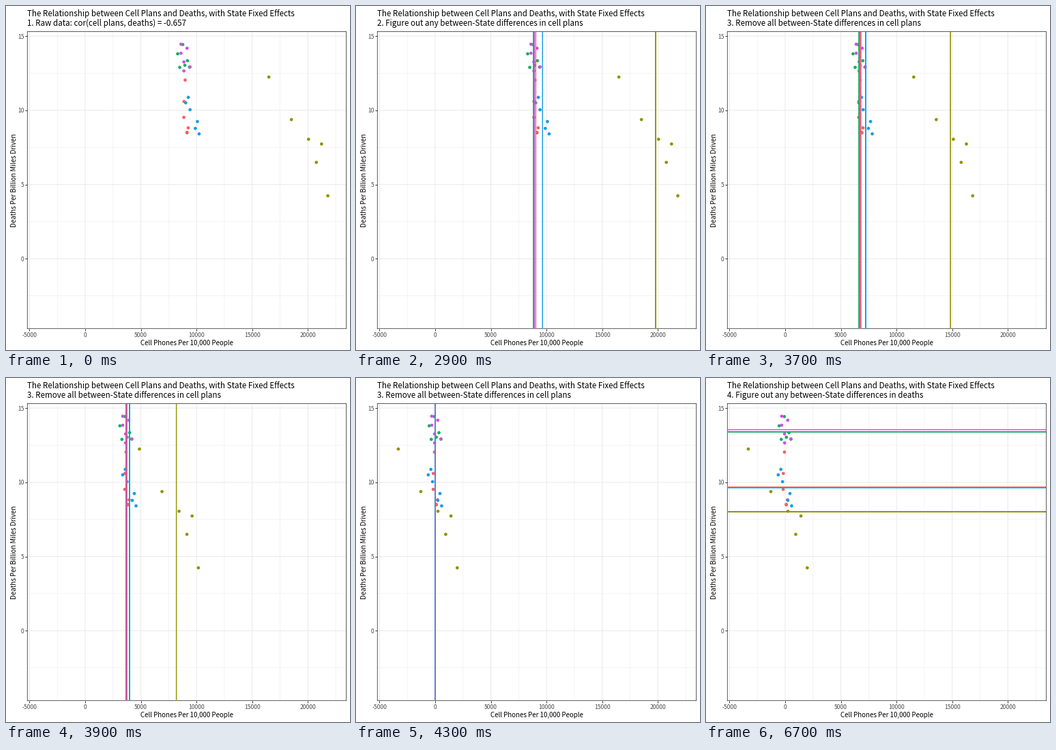
A matplotlib script for the animation above (8000 ms loop, 504 px wide and 504 px high).

```python
import numpy as np
import matplotlib.pyplot as plt
from matplotlib.animation import FuncAnimation
from matplotlib.collections import LineCollection

STEP = 100
FRAMES = 80
YEARS = 6
SIZE = 504
LEFT, RIGHT, TOP, BOTTOM = 31.3, 498.5, 37.6, 472.7
X0, X_SCALE = 116.0, 81.57 / 5000
Y0, Y_SCALE = 370.3, 21.753
XLIM = [(p - X0) / X_SCALE for p in (LEFT, RIGHT)]
YLIM = [(Y0 - p) / Y_SCALE for p in (BOTTOM, TOP)]

TITLE = "The Relationship between Cell Plans and Deaths, with State Fixed Effects"
STEPS = {
    0: "1. Raw data: cor(cell plans, deaths) = -0.657",
    500: "2. Figure out any between-State differences in cell plans",
    3500: "3. Remove all between-State differences in cell plans",
    6400: "4. Figure out any between-State differences in deaths",
}


def state(center, drift, bend=(0, 0), wave=(0, 0), pace=1):
    """Yearly (phones, deaths): a curved path about center, phones wavering."""
    u = np.linspace(-1, 1, YEARS)
    u = np.sign(u) * abs(u) ** pace
    path = np.outer(u, drift) + np.outer(u**2 - np.mean(u**2), bend) + center
    size, phase = wave
    path[:, 0] += size * np.cos(2 * np.pi * np.arange(YEARS) / 3 - phase)
    return path


# Listed from back to front
STATES = {
    "#939200": state((19809, 8.02), (3107, -4.0), (-1500, 0.35), (757, -0.27), 2),
    "#12b060": state((8845, 13.4), (154, -0.76), (0, 0.5), (477, -1.41)),
    "#f8605c": state((9040, 9.66), (229, -1.76), (0, 1.15), (175, 0.35)),
    "#d24fe6": state((8918, 13.55), (196, -0.9), wave=(375, 1.89), pace=0.7),
    "#169ce9": state((9651, 9.64), (615, -1.23), wave=(245, -0.38), pace=0.7),
}
COLORS = list(STATES)
DATA = np.array(list(STATES.values()))
MEAN_X, MEAN_Y = DATA.mean(axis=1).T

plt.rcParams.update({
    "font.family": "Noto Sans CJK JP",
    "axes.unicode_minus": False,
    "path.snap": False,
})
fig = plt.figure(figsize=(7, 7), dpi=72, facecolor="white")
ax = fig.add_axes([LEFT / SIZE, 1 - BOTTOM / SIZE,
                   (RIGHT - LEFT) / SIZE, (BOTTOM - TOP) / SIZE])
ax.set(xlim=XLIM, ylim=YLIM,
       xticks=range(-5000, 20001, 5000), yticks=range(0, 16, 5))
ax.set_xticks(np.arange(-2500, 22501, 5000), minor=True)
ax.set_yticks(np.arange(-2.5, 13, 5), minor=True)
ax.set_axisbelow(True)
ax.grid(which="major", color="#ebebeb", lw=1.07)
ax.grid(which="minor", color="#ebebeb", lw=0.55)
ax.tick_params(which="minor", length=0)
ax.tick_params(which="major", length=2.75, width=1, pad=2.2,
               color="#333333", labelcolor="#4d4d4d", labelsize=8.5)
for spine in ax.spines.values():
    spine.set(color="#333333", linewidth=0.8)


def label(x, y, text, size, **kw):
    kw = {"va": "baseline", **kw}
    return fig.text(x / SIZE, 1 - y / SIZE, text, size=size, color="black", **kw)


label((LEFT + RIGHT) / 2, 497, "Cell Phones Per 10,000 People", 9.7, ha="center")
label(16.8, (TOP + BOTTOM) / 2, "Deaths Per Billion Miles Driven", 9.7,
      ha="right", va="center", rotation=90)
label(LEFT - 0.3, 15, TITLE, 11.58)
subtitle = label(LEFT - 0.3, 29, "", 11.58)

dots = ax.scatter(*DATA.reshape(-1, 2).T, s=22, c=np.repeat(COLORS, YEARS),
                  linewidths=0, zorder=3)
# One line per observation, so soft edges build up
lines = LineCollection([], linewidths=1.07, colors=COLORS * YEARS,
                       zorder=4, capstyle="butt")
ax.add_collection(lines, autolim=False)


def mean_lines(t, shift):
    if 800 <= t < 6400:
        return [[(x, y) for y in YLIM] for x in MEAN_X - shift] * YEARS
    if t >= 6700:
        return [[(x, y) for x in XLIM] for y in MEAN_Y] * YEARS
    return []


def draw(i):
    t = i * STEP
    subtitle.set_text(STEPS[max(s for s in STEPS if s <= t)])
    p = np.clip((t - 3400) / 900, 0, 1)
    shift = MEAN_X * (1 - np.cos(np.pi * p)) / 2
    moved = DATA.copy()
    moved[:, :, 0] -= shift[:, None]
    dots.set_offsets(moved.reshape(-1, 2))
    lines.set_segments(mean_lines(t, shift))
    return dots, lines, subtitle


anim = FuncAnimation(fig, draw, frames=FRAMES, interval=STEP,
                     repeat=True, repeat_delay=0, blit=False)
plt.show()
```
